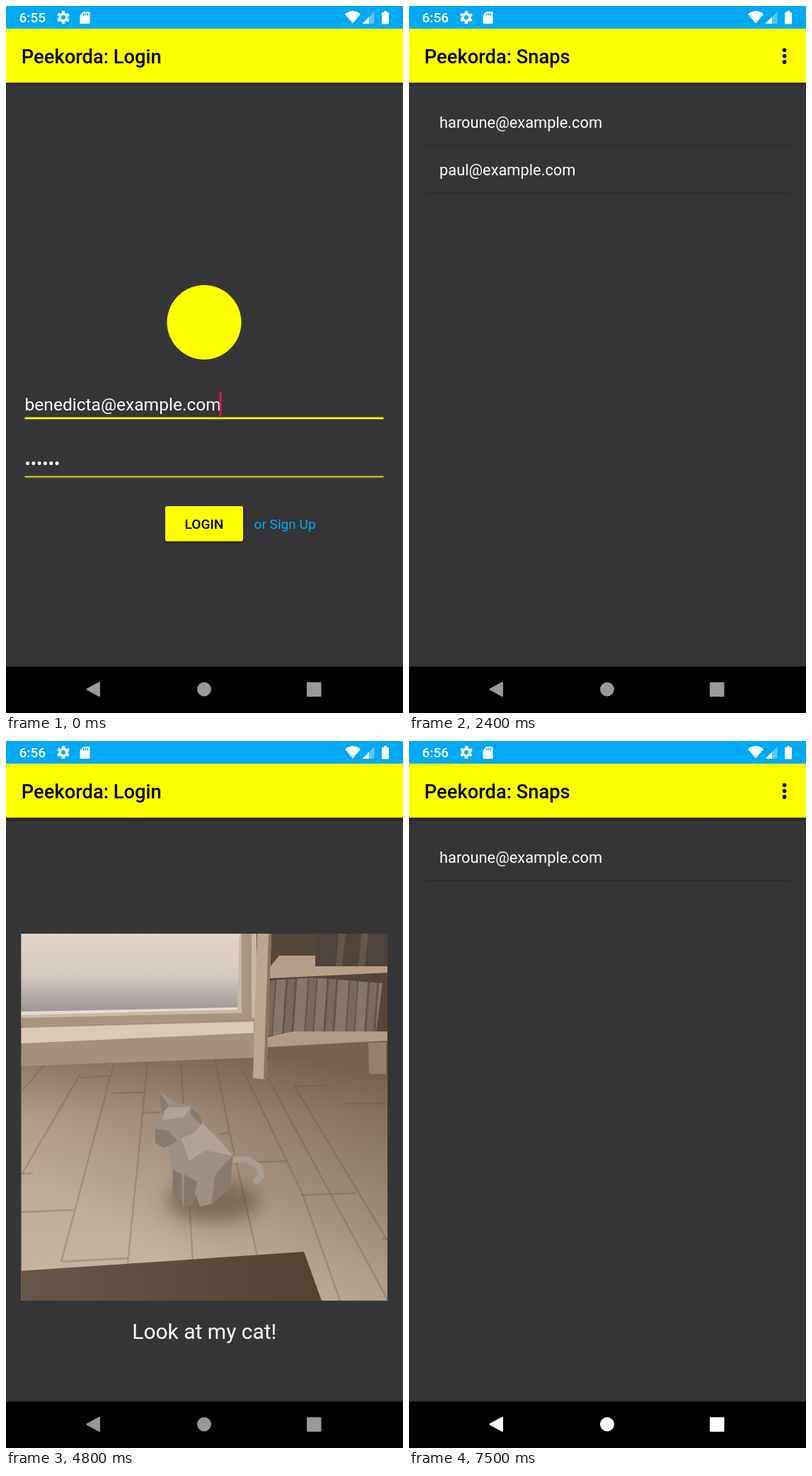
These frames come from a looping animation (561 by 998 pixels, 8000 ms). An HTML page:

```html
<!DOCTYPE html>
<html lang="en">
<head>
<meta charset="utf-8">
<style>
  html, body { margin: 0; width: 100%; height: 100%; overflow: hidden; background: #000; }
  svg { display: block; }
  text { font-family: Roboto, sans-serif; fill: #fff; }
  .title { font-size: 27.3px; font-weight: 500; fill: #000; }
  .field { font-size: 24.57px; }
  .row { font-size: 21.84px; }
  .small { font-size: 19.1px; }
  .medium { font-weight: 500; }
  .joints { fill: none; stroke: #7a6552; stroke-width: 2.4; opacity: .38; }
</style>
</head>
<body>
<svg id="stage" width="561" height="998" viewBox="0 0 561 998">
  <defs>
    <linearGradient id="barShadow" x2="0" y2="1">
      <stop stop-color="#000" stop-opacity=".4"/><stop offset="1" stop-color="#000" stop-opacity="0"/>
    </linearGradient>
    <linearGradient id="pane" x2="0" y2="1">
      <stop stop-color="#e2d6ca"/><stop offset=".55" stop-color="#d3c8bf"/><stop offset="1" stop-color="#9d9597"/>
    </linearGradient>
    <linearGradient id="floor" x2="0" y2="1">
      <stop stop-color="#9a846e"/><stop offset=".25" stop-color="#b9a590"/><stop offset="1" stop-color="#c7b6a3"/>
    </linearGradient>
    <linearGradient id="shade" x1=".3" y1=".75" x2="1" y2="0">
      <stop stop-color="#574432" stop-opacity="0"/><stop offset="1" stop-color="#574432" stop-opacity=".65"/>
    </linearGradient>
    <linearGradient id="table">
      <stop stop-color="#67574a"/><stop offset="1" stop-color="#554132"/>
    </linearGradient>
    <pattern id="books" width="58" height="200" patternUnits="userSpaceOnUse" patternTransform="skewX(-4)">
      <path fill="#7a6a5b" d="M0 0h58v200H0z"/>
      <path fill="#87776a" d="M0 0h13v200H0zM29 0h15v200H29z"/>
      <path fill="#635447" d="M13 0h3v200h-3zM26 0h3v200h-3zM44 0h2v200h-2zM56 0h2v200h-2z"/>
    </pattern>
    <filter id="blur" x="-50%" y="-60%" width="200%" height="220%"><feGaussianBlur stdDeviation="13"/></filter>
    <filter id="lift" x="-10%" y="-20%" width="120%" height="150%">
      <feDropShadow dx="0" dy="2" stdDeviation="2" flood-opacity=".45"/>
    </filter>
    <clipPath id="cut"><rect id="cutRect" width="561" height="998"/></clipPath>
    <clipPath id="buttonClip"><rect x="225" y="706" width="110" height="49.5" rx="2.7"/></clipPath>
    <clipPath id="rowClip"><rect x="21.8" y="198" width="517.5" height="65"/></clipPath>
    <g id="frame">
      <path fill="#363638" d="M0 0h561v998H0z"/>
      <path fill="#03a9f4" d="M0 0h561v33H0z"/>
      <path fill="#ff0" d="M0 32h561v76.300H0z"/>
      <path fill="url(#barShadow)" d="M0 108.3h561v6H0z"/>
      <path d="M0 932.5h561v66H0z"/>
    </g>
    <g id="menu"><circle cx="530.5" cy="62.3" r="2.8"/><circle cx="530.5" cy="70.6" r="2.8"/><circle cx="530.5" cy="78.9" r="2.8"/></g>
  </defs>

  <g id="login">
    <use href="#frame"/>
    <text class="title" x="21.8" y="81">Peekorda: Login</text>
    <circle cx="280" cy="446.5" r="52.5" fill="#ff0"/>
    <text class="field" x="26.5" y="571">benedicta@example.com</text>
    <path fill="#ff0" d="M26.5 580.5h507v2.7h-507z"/>
    <path id="caret" fill="#e0105c" d="M301.5 545h3v34h-3z"/>
    <text class="field" x="26.5" y="653.5">••••••</text>
    <path fill="#dede12" d="M26.5 663.6h507v1.8h-507z"/>
    <rect x="225" y="706" width="110" height="49.5" rx="2.7" fill="#ff0" filter="url(#lift)"/>
    <g clip-path="url(#buttonClip)"><circle id="buttonRipple" cx="280" cy="732"/></g>
    <text class="small medium" x="280" y="738.3" text-anchor="middle" style="fill:#000">LOGIN</text>
    <text class="small" x="350.5" y="738.3" style="fill:#03a9f4">or Sign Up</text>
  </g>

  <g id="list">
    <use href="#frame"/>
    <text class="title" x="21.8" y="81">Peekorda: Snaps</text>
    <use href="#menu"/>
    <text class="row" x="43" y="172">haroune@example.com</text>
    <path fill="#2c2c2e" d="M21.8 196.3h517.5v1.4H21.8z"/>
    <g id="secondRow">
      <g clip-path="url(#rowClip)"><circle id="rowRipple" cx="145" cy="232"/></g>
      <text class="row" x="43" y="239">paul@example.com</text>
      <path fill="#2f2f31" d="M21.8 262.8h517.5v1.4H21.8z"/>
    </g>
  </g>

  <g id="photo">
    <use href="#frame"/>
    <text class="title" x="21.8" y="81">Peekorda: Login</text>
    <svg x="21.5" y="272" width="517.5" height="518" viewBox="21.5 272 517.5 518">
      <path fill="url(#floor)" d="M21 440h519v350H21z"/>
      <path class="joints" d="M55 457 21 495M105 470 22 612M152 457 78 735M200 455 172 737M247 452 264 735M295 448 316 553 357 735M335 465 397 593 420 642 472 790M370 476 540 790M408 488 539 705"/>
      <path class="joints" d="M105 475 147 473M148 497 197 496M193 525 217 524M22 611 38 610M21 665 95 662M80 735 172 730M302 555 316 553M322 595 397 593M407 488 452 486M478 512 539 512M417 641 494 638M531 703h8"/>
      <path fill="url(#shade)" d="M21 440h519v350H21z"/>
      <path fill="#a5907a" d="M21 272h333v175L21 459z"/>
      <path fill="#c8b8a5" d="M21 383 327 376V272h27v119L21 402z"/>
      <path fill="#a8947e" d="M21 391 333 384V272h14v119L21 402z"/>
      <path fill="#e6dcd0" d="M21 381 327 374v5L21 387z"/>
      <path fill="url(#pane)" d="M21 272h309l-3 104L21 382z"/>
      <path fill="#d9cab8" d="M21 405 350 396v16L21 427z"/>
      <path fill="#55463a" d="M354 272h186v155L366 447z"/>
      <path fill="#77624e" d="M369 430 539 412v62l-40-20-130-8z"/>
      <path fill="#4f443c" d="M437 272h103v48l-103-2z"/>
      <path fill="#63564b" d="M470 272h10l-5 46h-9zM502 272h10l-5 46h-9z"/>
      <path fill="url(#books)" d="m374 338 57-4 30 2 71 6-9 70-155 4z"/>
      <path fill="#b69f86" d="m372 320 14-17h51v15h102v9l-167 8z"/>
      <path fill="#b29b81" d="m370 418 36-8h133v13l-169 9z"/>
      <path fill="#978069" d="m512 426 25-1v45h-24z"/>
      <path fill="#bda78e" d="M355 272h20l-7 206-19-2z"/>
      <path fill="#8b745f" d="M371 272h4l-7 206-4-1z"/>
      <ellipse cx="292" cy="650" rx="66" ry="30" fill="#5d4938" opacity=".6" filter="url(#blur)"/>
      <path d="M318 591h24l16 10 3 13-7 7" fill="none" stroke="#a99d92" stroke-width="9" stroke-linejoin="round" stroke-linecap="round"/>
      <path fill="#9c8f84" d="m216 494 27 18 20 3 12 15 2 9 22 22 22 24-5 47-26 22-16 3-6-17-5 16-13 1-2-17-3 4-11-2 3-16-4-26-4-29-7 3-11-7v-22l11-20z"/>
      <path fill="#afa298" d="m277 539 22 22 22 24-40-7-22 15-12-32 20-8zM226 517l35 0-10 14-30 4z"/>
      <path fill="#877a6f" d="m216 494 14 21-9 11zM211 547l18 3 13 14-13 8-7 2-11-7zM262 516l13 14 2 13-16-15zM321 585l-5 47-26 22 6-43z"/>
      <path fill="#85776a" d="m236 605 12 6 1 30-3 4-11-2zM252 612l18 10-6 34-13 2z"/>
      <path fill="url(#table)" d="m21 748 400-27 25 69H21z"/>
    </svg>
    <text x="280.3" y="844" text-anchor="middle" font-size="30">Look at my cat!</text>
  </g>

  <g fill="#fff">
    <text id="clock" class="small medium" x="18.5" y="23"></text>
    <g fill="none" stroke="#fff" transform="rotate(30 81 16)">
      <circle cx="81" cy="16" r="4.9" stroke-width="3.6"/>
      <circle cx="81" cy="16" r="7.5" stroke-width="3" stroke-dasharray="4.2 3.65" stroke-dashoffset="2.1"/>
    </g>
    <path d="M109.5 8H117q1.5 0 1.5 1.5v14q0 1.5-1.5 1.5h-11q-1.500 0-1.500-1.500V13z"/>
    <path stroke="#03a9f4" stroke-width="1.4" d="M109.7 10v3.5M112.5 10v3.5M115.3 10v3.5"/>
    <path d="M479 11.5q11-9 22 0L490 24.5z"/>
    <path opacity=".35" d="M520.5 8v17h-17z"/>
    <path d="M513 15.5V25h-9.5z"/>
    <path d="M534 7h4v2h2q1 0 1 1v14.5q0 1-1 1h-8q-1 0-1-1V10q0-1 1-1h2z"/>
    <rect id="backRipple" x="74" y="933" width="100" height="65" rx="32"/>
    <g id="nav" stroke="#fff" stroke-width="2" stroke-linejoin="round">
      <path d="m114.5 964.5 17.5-9.5v19z"/>
      <circle cx="280" cy="964.5" r="9"/>
      <path d="M426 955.5h18.5V974H426z"/>
    </g>
    <g id="touch">
      <circle r="18.5" fill="#5d6474" opacity=".5"/>
      <circle r="14.5" opacity=".5"/>
    </g>
  </g>
</svg>
<script>
const LOOP = 8000, STEP = 100, TRANSITION = 425;
const el = Object.fromEntries([...document.querySelectorAll('[id]')].map(n => [n.id, n]));
const clamp = v => Math.max(0, Math.min(1, v));

// y at x on a cubic segment given as eight coordinates
function curve(x, [x0, y0, x1, y1, x2, y2, x3, y3]) {
  const at = (s, a, b, c, d) => (1-s)**3*a + 3*(1-s)**2*s*b + 3*(1-s)*s*s*c + s**3*d;
  let lo = 0, hi = 1;
  for (let i = 0; i < 24; i++) {
    const mid = (lo + hi) / 2;
    if (at(mid, x0, x1, x2, x3) < x) lo = mid; else hi = mid;
  }
  return at(lo, y0, y1, y2, y3);
}
const slide = x => curve(x, [0, 0, .4, 0, .2, 1, 1, 1]);
const reveal = x => curve(x, x < 1/6 ? [0, 0, .05, 0, .1333, .06, 1/6, .4] : [1/6, .4, .2083, .82, .25, 1, 1, 1]);

const show = (node, on) => node.setAttribute('display', on ? 'inline' : 'none');
const shift = (node, y) => node.setAttribute('transform', `translate(0 ${y})`);

// elapsed holds the animation time at each step
const transitions = [
  { start: 2100, elapsed: [120, 220, 320], top: el.list, under: el.login },
  { start: 4400, elapsed: [55, 106, 215, 320], top: el.photo, under: el.list },
  { start: 7100, elapsed: [60, 160, 260, 360], top: el.photo, under: el.list, closing: true },
];

const touches = [
  { start: 800, x: 280, y: 732, ripple: el.buttonRipple },
  { start: 3700, x: 145, y: 232, ripple: el.rowRipple },
  { start: 6800, x: 130, y: 962 },
];

function transition(t, { start, elapsed, top, under, closing }) {
  const ms = elapsed[(t - start) / STEP];
  if (ms === undefined) return;
  const x = ms / TRANSITION, fade = clamp(ms / 117) / 10;
  const away = v => closing ? v : 1 - v;
  shift(top, Math.round(41 * away(slide(x))));
  el.cutRect.setAttribute('y', 957 * away(reveal(x)));
  top.setAttribute('clip-path', 'url(#cut)');
  shift(under, -20 * (1 - away(slide(x))));
  under.setAttribute('opacity', closing ? .9 + fade : 1 - fade);
}

function touch(t, { start, x, y, ripple }) {
  const age = t - start;
  if (age >= 0 && age < 200) {
    show(el.touch, true);
    el.touch.setAttribute('transform', `translate(${x} ${y})`);
  }
  if (!ripple) return;
  ripple.setAttribute('r', 20 + 67 * clamp(age / 300));
  ripple.setAttribute('opacity', age < 0 ? 0 : .12 * clamp((500 - age) / 300));
}

function draw(t) {
  el.clock.textContent = t < 100 ? '6:55' : '6:56';
  show(el.caret, t < 300 || t >= 800 && t < 1300 || t >= 1900);
  show(el.login, t < 2400);
  show(el.list, t >= 2100);
  show(el.photo, t >= 4400 && t < 7500);
  show(el.secondRow, t < 6900);
  show(el.touch, false);
  for (const screen of [el.login, el.list, el.photo]) {
    shift(screen, 0);
    screen.setAttribute('opacity', 1);
    screen.removeAttribute('clip-path');
  }
  transitions.forEach(item => transition(t, item));
  touches.forEach(item => touch(t, item));
  el.nav.setAttribute('opacity', .6 + .4 * clamp((t - 6800) / 250));
  el.backRipple.setAttribute('opacity', t < 6900 ? 0 : .2 * clamp((7400 - t) / 300));
}

function tick(now) {
  draw(Math.floor(now % LOOP / STEP) * STEP);
  requestAnimationFrame(tick);
}
tick(performance.now());
</script>
</body>
</html>
```
